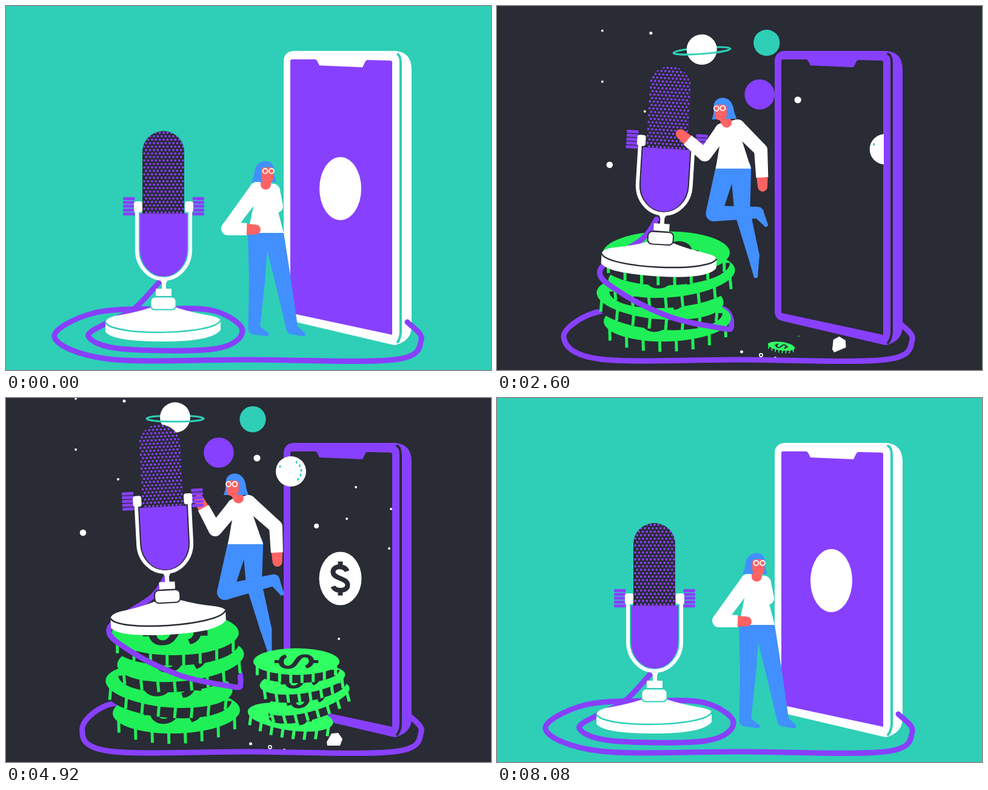
Animation of 800x600 px, one loop 8520 ms. Source, as an HTML page with a canvas:

```html
<!DOCTYPE html>
<html lang="en">
<head>
<meta charset="utf-8">
<title>Podcast in space</title>
<style>
html, body { margin: 0; width: 100%; height: 100%; overflow: hidden; background: #2ecfb6; }
canvas { display: block; width: 100%; height: 100%; }
</style>
</head>
<body>
<canvas id="stage" width="800" height="600"></canvas>
<script>
const ctx = document.getElementById('stage').getContext('2d');
const LOOP = 8520, STEP = 40;
const TEAL = '#2ecfb6', DARK = '#292b35', PURPLE = '#8840ff', WHITE = '#fff',
      BLUE = '#428fff', RED = '#ff6363', GREEN = '#1ff057', LIME = '#30ff64';

// Timing helpers
const clamp = v => Math.max(0, Math.min(1, v));
const ease = v => v * v * (3 - 2 * v);
const ramp = (t, a, b) => ease(clamp((t - a) / (b - a)));
function mix(a, b, k) {
  if (typeof a === 'number') return a + (b - a) * k;
  if (Array.isArray(a)) return a.map((v, i) => mix(v, b[i], k));
  return Object.fromEntries(Object.keys(a).map(key => [key, mix(a[key], b[key], k)]));
}
function track(t, keys) {
  if (t <= keys[0][0]) return keys[0][1];
  for (let i = 1; i < keys.length; i++) {
    if (t < keys[i][0]) return mix(keys[i - 1][1], keys[i][1], ramp(t, keys[i - 1][0], keys[i][0]));
  }
  return keys[keys.length - 1][1];
}

// Drawing helpers
function fill(path, color) { ctx.fillStyle = color; ctx.fill(path); }
function stroke(path, color, width) {
  ctx.strokeStyle = color; ctx.lineWidth = width; ctx.stroke(path);
}
function oval(x, y, rx, ry = rx, from = 0, to = 2 * Math.PI) {
  const path = new Path2D();
  path.ellipse(x, y, rx, ry, 0, from, to);
  return path;
}
function box(x, y, w, h, r) {
  const path = new Path2D();
  path.roundRect(x, y, w, h, r);
  return path;
}
function polygon(points) {
  const path = new Path2D();
  points.forEach(p => path.lineTo(...p));
  path.closePath();
  return path;
}
// Smooth open curve through points[from] to points[to]
function curve(points, from = 0, to = points.length - 1) {
  const path = new Path2D();
  const p = i => points[Math.max(0, Math.min(points.length - 1, i))];
  path.moveTo(...p(from));
  for (let i = from; i < to; i++) {
    const [a, b, c, d] = [p(i - 1), p(i), p(i + 1), p(i + 2)];
    path.bezierCurveTo(b[0] + (c[0] - a[0]) / 6, b[1] + (c[1] - a[1]) / 6,
                       c[0] - (d[0] - b[0]) / 6, c[1] - (d[1] - b[1]) / 6, ...c);
  }
  return path;
}
// Chain of tapered, round-jointed segments
function limb(joints, radii, color) {
  joints.forEach(([x, y], i) => {
    fill(oval(x, y, radii[i]), color);
    if (!i) return;
    const [px, py] = joints[i - 1], length = Math.hypot(x - px, y - py) || 1;
    const nx = (py - y) / length, ny = (x - px) / length, r = radii[i - 1], s = radii[i];
    fill(polygon([[px + nx * r, py + ny * r], [x + nx * s, y + ny * s],
                  [x - nx * s, y - ny * s], [px - nx * r, py - ny * r]]), color);
  });
}
function at(x, y, angle, draw) {
  ctx.save(); ctx.translate(x, y); ctx.rotate(angle); draw(); ctx.restore();
}

// Phone
const phoneBody = new Path2D('M458 92Q458 75 475 74H642Q669 76 669 105V530Q668 552 642 559L636 558L470 519Q458 516 458 503Z');
const screen = new Path2D('M472 88H509Q512 88 513 90L517 98L588 101L593 91Q594 89 597 89L634 90Q637 90 637 93V542L469 506V91Q469 88 472 88Z');
const phoneSeam = new Path2D('M645 79Q651 81 651 94V538Q650 550 645 555');
const dollarSign = new Path2D('M11-12C8-22-13-22-12-10C-11 1 12-1 12 11C12 22-9 22-12 13M0-18V-28M0 19V28');

function drawPhone(dark) {
  fill(phoneBody, dark ? PURPLE : WHITE);
  fill(screen, dark ? DARK : PURPLE);
  stroke(phoneSeam, dark ? DARK : TEAL, 4);
  if (!dark) fill(oval(551.5, 301, 34.5, 52), WHITE);
}
function drawDollarBadge(t) {
  const size = ramp(t, 4280, 4640);
  at(551.5, 297.5, 0, () => {
    ctx.scale(size, size);
    fill(oval(0, 0, 35, 44), WHITE);
    ctx.lineCap = 'butt';
    stroke(dollarSign, DARK, 8);
  });
}

// Space: things fly out of the phone, slowing down towards their resting place
function flight(t, x, y, delay = 0) {
  const left = Math.max(0, 1 - (t - 1480 - delay) / 2760) ** 3.4;
  return [x + 345 * left, y + 234 * left];
}
const nearStars = [[115, 1, 2], [195, 5, 2.5], [115, 85, 2], [185, 134, 2], [127, 222, 5.3]];
const lateStars = [[512, 211, 4], [577, 147, 2], [635, 183, 2], [562, 199, 2], [632, 248, 2], [549, 397, 2]];

function drawSpace(t) {
  ctx.save();
  ctx.clip(box(0, 0, 638, 600, 0));
  for (const [x, y, r] of nearStars) fill(oval(...flight(t, x, y), r), WHITE);
  for (const [x, y, r] of lateStars) fill(oval(...flight(t, x, y, 920), r), WHITE);
  fill(oval(...flight(t, 414, 99, 170), 5.6), WHITE);
  fill(oval(403.5, 570, 2.5), WHITE);
  stroke(oval(435.5, 575.5, 2.6), WHITE, 1.6);
  fill(oval(459, 580, 2), WHITE);

  const [x, y] = flight(t, 279, 32);
  at(x, y, (279 - x) / 790, () => {
    stroke(oval(0, 2, 47, 5), TEAL, 2.8);
    fill(oval(0, 0, 25), WHITE);
    stroke(oval(0, 2, 47, 5, 0, Math.PI), TEAL, 2.8);
  });
  fill(oval(...flight(t, 407, 35, -200), 21.6), TEAL);
  fill(oval(...flight(t, 351, 90, 170), 24.8), PURPLE);
  at(...flight(t, 470, 121, 600), 0, () => {
    fill(oval(0, 0, 25), WHITE);
    fill(oval(-18, -8, 1.5, 2.3), TEAL);
    for (let a = -1; a < 1.2; a += .45) fill(oval(17 * Math.cos(a), 18 * Math.sin(a), 1.5, 2.3), TEAL);
  });
  const roll = ramp(t, 1600, 2900);
  at(mix(700, 542, roll), mix(520, 563, roll), 3 * (roll - 1), () =>
    fill(polygon([[-13, 4], [-5, -10], [6, -11], [13, -1], [9, 10], [-12, 10]]), WHITE));
  drawDollarBadge(t);
  ctx.restore();
}

// Coins
function drawCoin(x, y, rx, ry, tilt, size, color) {
  const depth = 8 + ry / 4;
  at(x, y + (1 - size) * 45, tilt, () => {
    ctx.scale(size, size);
    fill(oval(0, depth, rx, ry, 0, Math.PI), DARK);
    ctx.lineCap = 'butt';
    const teeth = new Path2D();
    for (let i = -3.5; i <= 3.5; i++) {
      const edge = ry * Math.sqrt(1 - (i * .26) ** 2);
      teeth.moveTo(i * .26 * rx, edge - 4);
      teeth.lineTo(i * .26 * rx, edge + depth);
    }
    stroke(teeth, color, 5);
    fill(oval(0, 0, rx, ry), color);
    ctx.scale(rx / 55, ry / 28);
    ctx.rotate(Math.PI / 2);
    stroke(dollarSign, DARK, 6.5);
  });
}
// Coins pop up one above the other, each pushed sideways a little
function drawStack(t, { x, y, rx, ry, gap, shifts, start, every, color }) {
  const leave = 1 - ramp(t, 6000, 6380);
  shifts.forEach((shift, i) => {
    const born = start + i * every;
    drawCoin(x + shift, y - i * gap, rx, ry, -shift / rx, ramp(t, born, born + 400) * leave, color);
  });
}
function drawLeftCoins(t) {
  const gap = track(t, [[2120, 34], [3200, 40], [4240, 43]]);
  drawStack(t, { x: 278, y: 517, rx: 105, ry: 36, gap, shifts: [3, -9, 10, 1], start: 1360, every: 270, color: GREEN });
}
function drawRightCoins(t) {
  const lift = ramp(t, 3200, 4240);
  drawStack(t, { x: 479, y: 530 - 4 * lift, rx: 71, ry: 22, gap: 29.5 + lift, shifts: [-10, 19, 10, 0],
    start: 2450, every: 110, color: LIME });
}

// Cable: from the phone along the floor, then round the microphone foot.
// The coil points are offsets from the foot, on the floor and when lifted.
const floorCoil = [[85, -22], [130, 10], [85, 40], [-70, 40], [-124, 20], [-95, -2], [-50, -25], [-7, -70]];
const liftedCoil = [[100, 80], [118, 112], [95, 112], [18, 95], [-62, 56], [-98, 17], [-28, -34], [-5, -66]];
function cablePoints(footX, footY) {
  const height = 525 - footY;
  const coil = mix(floorCoil, liftedCoil, clamp(height / 70));
  return [[662, 521], [685, 550], [640, 583], [400, 583], [170, 582],
    [80 + height * .28, 546], [145 + height * .14, 506], [260, 499],
    ...coil.map(([x, y]) => [footX + x, Math.min(565, footY + y)])];
}
function drawCable(points, from, to) {
  ctx.lineCap = ctx.lineJoin = 'round';
  stroke(curve(points, from, to), PURPLE, 9);
}

// Microphone, drawn in its resting place
const micHead = new Path2D('M225 342V240.5A34.5 34.5 0 0 1 294 240.5V342Z');
const micBody = new Path2D('M221 342H299V402A39 44 0 0 1 221 402Z');
const micYoke = new Path2D('M216 330V402A44 48 0 0 0 304 402V330');
const micStem = new Path2D('M252 447H269L264 457V466H273V478H247V466H257V457Z');
const micBase = new Path2D('M164 521Q166 513 185 510Q215 505 239 497H281Q305 505 335 510Q352 513 354 518V534Q340 553 260 553Q175 553 164 537Z');
const micBaseSeam = new Path2D('M164 521C172 545 344 543 354 518');
const micDots = new Path2D();
for (let row = 0; row < 24; row++) {
  for (let x = 228 + (row % 2) * 3.2; x < 296; x += 6.4) {
    micDots.moveTo(x + 1.9, 209 + row * 5.7);
    micDots.arc(x, 209 + row * 5.7, 1.9, 0, 2 * Math.PI);
  }
}
function drawMic(x, y, degrees, gap) {
  at(x, y, degrees * Math.PI / 180, () => {
    ctx.translate(-260, -525);
    fill(micHead, DARK);
    ctx.save(); ctx.clip(micHead); fill(micDots, PURPLE); ctx.restore();
    fill(micBody, PURPLE);
    ctx.lineCap = 'butt';
    stroke(micYoke, WHITE, 6);
    for (const side of [193, 307.5]) {
      for (let i = 0; i < 5; i++) fill(box(side, 315 + i * 6.3, 19.5, 5, 1.5), PURPLE);
    }
    fill(box(211, 322, 14, 18, 4), WHITE);
    fill(box(295, 322, 14, 18, 4), WHITE);
    fill(micStem, WHITE);
    fill(micBase, WHITE);
    stroke(micBaseSeam, gap, 2.5);
    const collar = box(238.5, 479.5, 42, 21, 7);
    fill(collar, WHITE);
    stroke(collar, gap, 2);
  });
}

// Person: a skeleton per pose. head: x, y, side, tilt, hair puff;
// arms: shoulder, elbow, wrist; legs: knee, ankle, toe
const stand = {
  head: [431, 277, 1, 0, 0], hips: [[399, 374], [458, 374]],
  armL: [[414, 302], [366, 367], [398, 368]], armR: [[440, 305], [446, 330], [442, 320]],
  legL: [[414, 455], [409, 532], [430, 541]], legR: [[458, 458], [472, 532], [490, 541]]
};
const reach = { ...stand, armR: [[440, 305], [485, 309], [535, 302]] };
const pulled = {
  head: [345, 269, 1, .5, .15], hips: [[280, 360], [332, 362]],
  armL: [[307, 296], [315, 343], [347, 361]], armR: [[331, 297], [352, 328], [392, 350]],
  legL: [[333, 434], [347, 500], [366, 510]], legR: [[379, 410], [411, 486], [428, 491]]
};
const hover = {
  head: [359, 191, -1, -.1, 0], hips: [[350, 286], [409, 286]],
  armL: [[360, 224], [338, 266], [290, 265]], armR: [[390, 217], [415, 252], [418, 304]],
  legL: [[350, 350], [407, 386], [420, 402]], legR: [[395, 365], [412, 435], [410, 463]]
};
const lean = {
  head: [374, 165, -1, 0, .05], hips: [[366, 259], [424, 259]],
  armL: [[377, 196], [345, 235], [325, 198]], armR: [[400, 190], [445, 230], [447, 274]],
  legL: [[361, 338], [442, 318], [455, 340]], legR: [[409, 325], [429, 400], [435, 436]]
};
const jump = {
  head: [433, 259, 1, 0, 1], hips: [[404, 354], [471, 362]],
  armL: [[416, 287], [391, 245], [367, 206]], armR: [[454, 290], [490, 306], [513, 350]],
  legL: [[390, 432], [405, 494], [394, 511]], legR: [[462, 440], [473, 518], [487, 537]]
};
const poseKeys = [[160, stand], [560, reach], [880, reach], [1480, pulled], [2120, hover],
  [2900, lean], [5960, lean], [6440, jump], [7000, stand]];
const hair = new Path2D('M-26 13Q-22 5-21-5C-16-29 12-24 11-8Q11 4 15 13Z');

function drawHead([x, y, side, tilt, puff]) {
  at(x, y, tilt, () => {
    ctx.scale(side < 0 ? -1 : 1, 1);
    ctx.save();
    ctx.translate(0, -8 * puff);
    ctx.scale(1 + .2 * puff, 1 + .45 * puff);
    fill(hair, BLUE);
    ctx.restore();
    fill(box(-10, -11, 20, 26, [5, 4, 9, 9]), RED);
    for (const lens of [-3.5, 7]) stroke(oval(lens, -5, 4), WHITE, 1.8);
  });
}
function drawArm(joints) {
  const [, elbow, wrist] = joints;
  const reachOut = 14 / (Math.hypot(wrist[0] - elbow[0], wrist[1] - elbow[1]) || 1);
  limb([wrist, mix(elbow, wrist, 1 + reachOut)], [9, 8], RED);
  // Sleeve ends in a straight cuff
  const cuff = mix(elbow, wrist, .97);
  limb(joints.slice(0, 2), [12, 11], WHITE);
  const angle = Math.atan2(cuff[1] - elbow[1], cuff[0] - elbow[0]);
  at(...elbow, angle, () => {
    const length = Math.hypot(cuff[0] - elbow[0], cuff[1] - elbow[1]);
    fill(polygon([[0, -11], [length, -10], [length, 10], [0, 11]]), WHITE);
  });
}
function drawPerson({ head, hips, armL, armR, legL, legR }) {
  const legRadii = [17, 13, 9.5, 3.5];
  drawArm(armR);
  limb([mix(...hips, .29), ...legL], legRadii, BLUE);
  limb([mix(...hips, .71), ...legR], legRadii, BLUE);
  limb([armL[0], armR[0]], [12, 12], WHITE);
  fill(polygon([armL[0], armR[0], hips[1], hips[0]]), WHITE);
  drawArm(armL);
  const collar = mix(mix(armL[0], armR[0], .5), head, .35);
  limb([head, collar], [8, 8.5], RED);
  drawHead(head);
}

const micKeys = [[720, [260, 525, 0]], [1480, [261.5, 524, .3]], [2120, [264, 444, 6.1]], [3200, [274, 381, 0]],
  [4240, [268.5, 362, -3]], [5960, [268.5, 362, -3]], [6440, [245, 424, -6.1]], [7040, [260, 525, 0]]];

function drawScene(t, dark) {
  const gap = dark ? DARK : TEAL;
  const bob = Math.sin((t - 4920) / 280) * 3 * ramp(t, 4100, 4500) * (1 - ramp(t, 5700, 5960));
  const lift = -18 * ramp(t, 3200, 4240) * (1 - ramp(t, 5960, 6440));
  const [micX, micY, micTurn] = track(t, micKeys);
  const cable = cablePoints(micX, micY);
  const mic = () => drawMic(micX, micY + bob, micTurn, gap);
  const person = () => at(0, lift + bob, 0, () => drawPerson(track(t, poseKeys)));

  ctx.fillStyle = gap;
  ctx.fillRect(0, 0, 800, 600);
  drawPhone(dark);
  if (dark) drawSpace(t);
  drawCable(cable, 0, 9);
  if (dark) drawLeftCoins(t);
  drawCable(cable, 9, 15);
  if (t > 2600 && t < 6000) { person(); mic(); } else { mic(); person(); }
  if (dark) drawRightCoins(t);
}

// Night spills out of the screen to the left, then sweeps to the right
function spillingNight(t) {
  const area = new Path2D(), size = ramp(t, 720, 1080), spread = ramp(t, 1000, 1480);
  area.addPath(screen, new DOMMatrix([size, 0, 0, size, 551 * (1 - size), 301 * (1 - size)]));
  if (!spread) return area;
  const push = 700 * clamp((t - 1480) / 380) ** 2;
  const top = mix([474, 86], [388, 0], spread), bottom = mix([517, 517], [410, 600], spread);
  const far = mix(469, -400, spread);
  area.moveTo(517 + push, 517);
  area.quadraticCurveTo(mix(517, 455, spread) + push, mix(517, 550, spread), bottom[0] + push, bottom[1]);
  area.lineTo(far, mix(512, 1200, spread));
  area.lineTo(far, mix(87, -700, spread));
  area.lineTo(top[0] + push, top[1]);
  area.quadraticCurveTo(mix(474, 422, spread) + push, mix(86, 48, spread), 474 + push, 86);
  area.closePath();
  return area;
}
// Night drains away through the right edge; the outline is mirrored top to bottom
const drainOutline = [[637, 95], [648, 130], [690, 155], [722, 168], [757, 203], [800, 246], [900, 280], [2000, 520]];
function drainingNight(t) {
  const shift = t < 6440 ? -1000 * (1 - clamp((t - 5960) / 480)) ** 1.4 : 300 * (t - 6440) / 320;
  const grow = Math.max(.4, 1 - shift / 300);
  const side = sign => drainOutline.map(([x, y]) => [x + shift, 312 + sign * y * grow]);
  return curve([...side(-1).reverse(), ...side(1)]);
}
function nightArea(t) {
  if (t < 720 || t > 6760) return new Path2D();
  if (t < 1880) return spillingNight(t);
  return t < 5960 ? box(0, 0, 800, 600, 0) : drainingNight(t);
}

function frame(now) {
  const t = Math.floor((now % LOOP) / STEP) * STEP;
  drawScene(t, false);
  ctx.save();
  ctx.clip(nightArea(t));
  drawScene(t, true);
  ctx.restore();
  requestAnimationFrame(frame);
}
requestAnimationFrame(frame);
</script>
</body>
</html>
```
